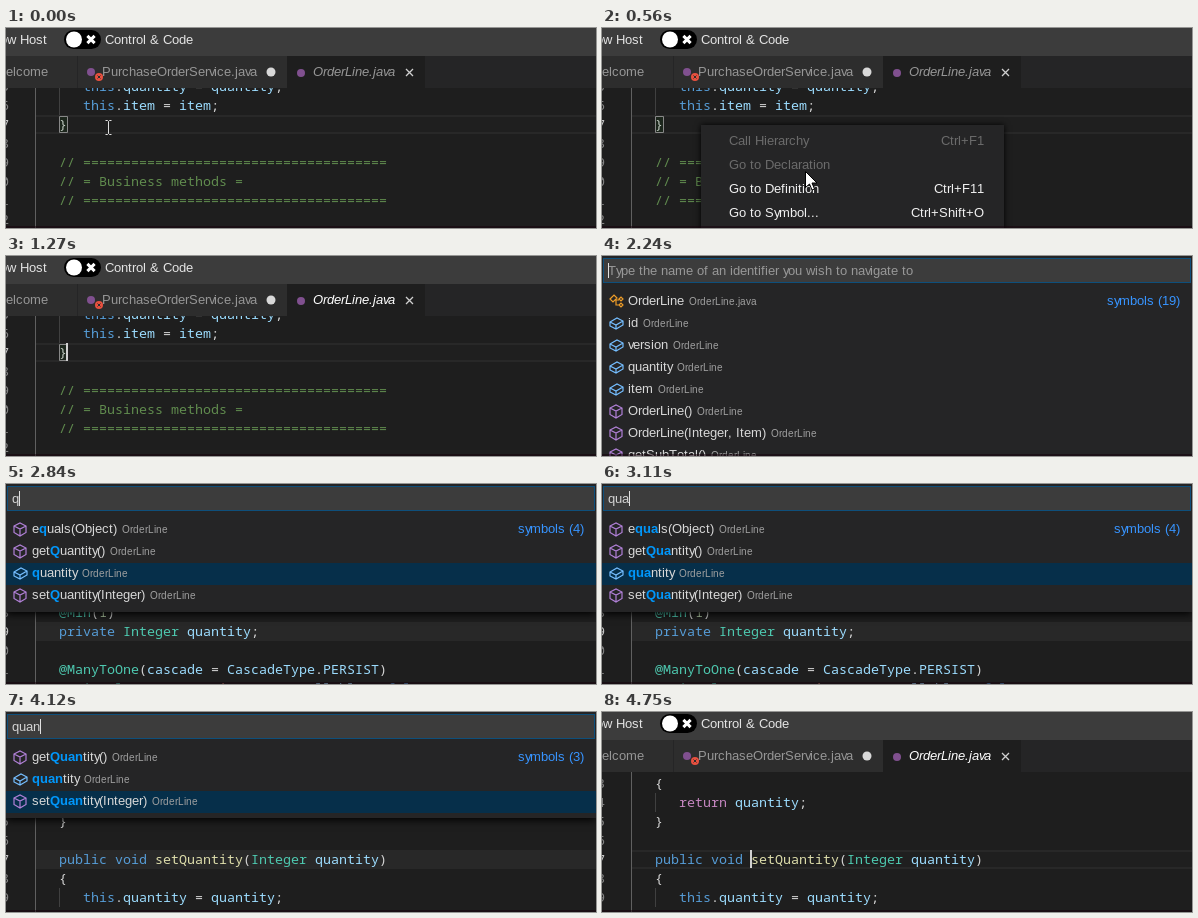
Animation of 590 by 200 pixels, one loop 5.48 s. Source, as an HTML page with a canvas:

```html
<!DOCTYPE html>
<html lang="en">
<head>
<meta charset="utf-8">
<style>
html, body { margin: 0; width: 100%; height: 100%; overflow: hidden; background: #1e1e1e; }
canvas { display: block; }
</style>
</head>
<body>
<canvas id="stage" width="590" height="200"></canvas>
<script>
const ctx = document.getElementById('stage').getContext('2d');
const LOOP = 5480;
const SANS = '"Liberation Sans", Arial, sans-serif';
const UI = `13px ${SANS}`, BOLD = `bold ${UI}`, ITALIC = `italic ${UI}`, SMALL = `10px ${SANS}`;
const MONO = '13.333px "Noto Sans Mono", monospace';

function rect(x, y, w, h, color) {
  ctx.fillStyle = color;
  ctx.fillRect(x, y, w, h);
}

function disc(x, y, r, color) {
  ctx.fillStyle = color;
  ctx.beginPath();
  ctx.arc(x, y, r, 0, 7);
  ctx.fill();
}

function path(d, x, y, stroke, width = 1, fill) {
  const p = new Path2D(d);
  ctx.save();
  ctx.translate(x, y);
  if (fill) { ctx.fillStyle = fill; ctx.fill(p); }
  ctx.strokeStyle = stroke;
  ctx.lineWidth = width;
  ctx.stroke(p);
  ctx.restore();
}

const cross = (x, y, r, color, width) => path(`M${-r} ${-r}L${r} ${r}M${r} ${-r}L${-r} ${r}`, x, y, color, width);

// Whole-pixel advances as in hinted text, where v and y come out narrow at 13px
function advance(c) {
  const w = ctx.measureText(c).width;
  const narrow = /[vy]/.test(c) && ctx.font.includes('13px');
  return Math.floor(w * (narrow ? 0.8 : 1) + 0.51);
}

function text(s, x, mid, color, font = UI, right) {
  ctx.font = font;
  ctx.fillStyle = color;
  if (right) for (const c of s) x -= advance(c);
  for (const c of s) {
    ctx.fillText(c, x, mid + 4);
    x += advance(c);
  }
  return x;
}

// ---- editor ----
const views = {
  business: { top: 59, first: 5, active: 2, lines: [
    '      this.quantity = quantity;', '      this.item = item;', '   }', '',
    '   // ' + '='.repeat(38), '   // = Business methods =', '   // ' + '='.repeat(38), ''] },
  field: { top: 110, first: 7, active: 2, lines: [
    '   @Column(nullable = false)', '   @Min(1)', '   private Integer quantity;', '',
    '   @ManyToOne(cascade = CascadeType.PERSIST)', '   @JoinColumn(name = "item_FK", nullable = false)'] },
  setter: { top: 72, first: 3, active: 4, lines: [
    '   {', '      return quantity;', '   }', '', '   public void setQuantity(Integer quantity)',
    '   {', '      this.quantity = quantity;', '   }'] }
};

const syntax = [
  [/^\/\/.*/, '#608b4e'], [/^"[^"]*"/, '#ce9178'], [/^return\b/, '#c586c0'],
  [/^(this|public|private|void|false)\b/, '#569cd6'], [/^([A-Z]{2,}|[A-Z]\w*(?=\.))/, '#9cdcfe'],
  [/^@?[A-Z]\w*/, '#4ec9b0'], [/^\w+(?=\()/, '#dcdcaa'], [/^\d+/, '#b5cea8'],
  [/^[a-z]\w*/, '#9cdcfe'], [/^./, '#d4d4d4']
];

function codeLine(s, x, mid) {
  while (s) {
    const [re, color] = syntax.find(([r]) => r.test(s));
    const token = s.match(re)[0];
    x = text(token, x, mid, color, MONO);
    s = s.slice(token.length);
  }
}

function editor({ top, first, active, lines }, previewing) {
  rect(0, 60, 590, 140, '#1e1e1e');
  const y = top + active * 19 - 10;
  rect(30, y, 560, 19, '#282828');
  if (!previewing) rect(30, y + 2, 560, 15, '#1f1f1f');
  rect(29, 60, 1, 140, '#606060');
  lines.forEach((s, i) => {
    const mid = top + i * 19;
    text(String((first + i) % 10), -5, mid, i === active ? '#c6c6c6' : '#858585', MONO);
    if (s.startsWith('      ')) rect(53, mid - 10, 1, 19, '#404040');
    codeLine(s, 29, mid);
  });
}

function bracketBox() {
  rect(53, 88, 9, 17, 'rgba(0,100,0,.1)');
  path('M.5 .5H8.5V16.5H.5Z', 53, 88, '#888');
}

// ---- header and tabs ----
function header(focused) {
  rect(0, 0, 590, 28, '#3c3c3c');
  text('Show Host', 41, 12, '#e4e4e4', UI, true);
  ctx.fillStyle = '#000';
  ctx.beginPath();
  ctx.roundRect(58, 2, 37, 19, 9.5);
  ctx.fill();
  disc(68, 11.5, 8, '#fff');
  cross(85, 11.5, 3.6, '#fff', 3);
  text('Control & Code', 99, 12, '#e4e4e4');

  rect(0, 28, 590, 32, '#252526');
  rect(0, 28, 71, 32, '#2d2d2d');
  rect(72, 28, 209, 32, '#2d2d2d');
  rect(281, 28, 138, 32, '#1e1e1e');
  text('elcome', 0, 44, '#969696');
  disc(85, 44, 4, '#80508f');
  disc(93, 49, 4, '#e8503f');
  cross(93, 49, 1.5, '#2d2d2d', 1);
  text('PurchaseOrderService.java', 96, 44, '#969696');
  disc(265, 44, 4.5, '#d8d8d8');
  disc(295, 45, 4, '#80508f');
  text('OrderLine.java', 307, 44, focused ? '#fff' : '#979797', ITALIC);
  cross(403.5, 44.5, 3.5, '#d0d0d0', 1.3);
}

// ---- context menu ----
const menuItems = [
  ['Call Hierarchy', 'Ctrl+F1'], ['Go to Declaration', ''],
  ['Go to Definition', 'Ctrl+F11'], ['Go to Symbol...', 'Ctrl+Shift+O']
];

function menu(t) {
  ctx.save();
  ctx.shadowColor = '#000';
  ctx.shadowBlur = 6;
  rect(99, 97, 303, 110, '#252526');
  ctx.restore();

  const u = Math.max(0, Math.min(1, (Math.floor((t - 400) / 40) + 1) / 9));
  const x = Math.round(101 + 127 * (1 - (1 - u) ** 2)), y = Math.round(98 + 81 * u);
  menuItems.forEach(([label, keys], i) => {
    const mid = 113 + i * 24, enabled = i > 1;
    if (enabled && y >= mid - 12 && y < mid + 12) rect(99, mid - 12, 303, 24, '#094771');
    const color = enabled ? '#f0f0f0' : '#6b6b6b';
    text(label, 127, mid, color);
    text(keys, 382, mid, color, UI, true);
  });
  path('M0 0V16L4 12.5L6.5 18.5L9 17.5L6.5 11.5H11.5Z', x + .5, y + .5, '#000', 1, '#fff');
}

// ---- symbol picker ----
const icons = {
  type: ['#ee9d28', 'M1 4L5 0L8 3L4 7ZM6 5H10M7 5V10H10M10 4L12 2L14 4L12 6ZM10 10L12 8L14 10L12 12Z'],
  field: ['#75beff', 'M1 5L8 1L14 4V8L7 12L1 9ZM1 5L7 8L14 4M7 8V12'],
  method: ['#b180d7', 'M1 3L7 0L13 3V9.5L7 13L1 9.5ZM1 3L7 6L13 3M7 6V13']
};

const symbols = [
  ['OrderLine', 'type'], ['id', 'field'], ['version', 'field'], ['quantity', 'field'], ['item', 'field'],
  ['OrderLine()', 'method'], ['OrderLine(Integer, Item)', 'method'], ['getSubTotal()', 'method']
];
const matches = [
  ['equals(Object)', 'method'], ['getQuantity()', 'method'], ['quantity', 'field'], ['setQuantity(Integer)', 'method']
];

function picker(query, selected, caretOn) {
  const found = query ? matches.filter(([s]) => s.toLowerCase().includes(query)) : symbols;
  const height = query ? 40 + 22 * found.length : 200;
  ctx.save();
  ctx.shadowColor = '#000';
  ctx.shadowBlur = 8;
  ctx.shadowOffsetY = 2;
  rect(0, 0, 590, height, '#252526');
  ctx.restore();
  rect(1, 2, 588, 25, '#0e4f7b');
  rect(2, 3, 586, 23, '#3c3c3c');
  if (query) text(query, 6, 15, '#d4d4d4');
  else text('Type the name of an identifier you wish to navigate to', 6, 15, '#989898');
  if (caretOn) rect(6 + query.length * 7, 7, 1, 15, '#e0e0e0');

  found.forEach(([name, kind], i) => {
    const mid = 45 + i * 22;
    if (name === selected) rect(0, mid - 10, 590, 22, '#062f4a');
    const [color, shape] = icons[kind];
    path(shape, 7, mid - 6, color, 1.2);
    const at = name.toLowerCase().indexOf(query), end = at + query.length;
    let x = text(name.slice(0, at), 26, mid, '#d8d8d8');
    x = text(name.slice(at, end), x, mid, '#0097fb', BOLD);
    x = text(name.slice(end), x, mid, '#d8d8d8');
    text(kind === 'type' ? 'OrderLine.java' : 'OrderLine', x + 5, mid, '#a0a0a0', SMALL);
  });
  text(`symbols (${query ? found.length : 19})`, 578, 45, '#3794ff', UI, true);
}

function draw(t) {
  const picking = t >= 2240 && t < 4750;
  editor(t < 2840 ? views.business : t < 4120 ? views.field : views.setter, picking);
  if (!picking) header(t >= 1190);

  if (t < 2240) {
    bracketBox();
    if (t < 80) path('M-3 0H-1L0 1L1 0H3M0 1V13M-3 14H-1L0 13L1 14H3', 102.5, 92.5, '#e0e0e0');
    else if (t < 1190) menu(t);
    else rect(60, 87, 2, 18, '#d0d0d0');
  } else if (picking) {
    const typed = [2840, 2970, 3110, 3240].filter(at => t >= at).length;
    const caretOn = t < 3420 || (t >= 4120 && t < 4610);
    picker('quan'.slice(0, typed), t >= 4120 ? 'setQuantity(Integer)' : typed ? 'quantity' : '', caretOn);
  } else {
    rect(148, 138, 2, 18, '#d0d0d0');
  }
  rect(0, 198, 590, 2, 'rgba(22,0,10,.5)');
}

const start = performance.now();
function tick() {
  draw((performance.now() - start) % LOOP);
  requestAnimationFrame(tick);
}
tick();
</script>
</body>
</html>
```
